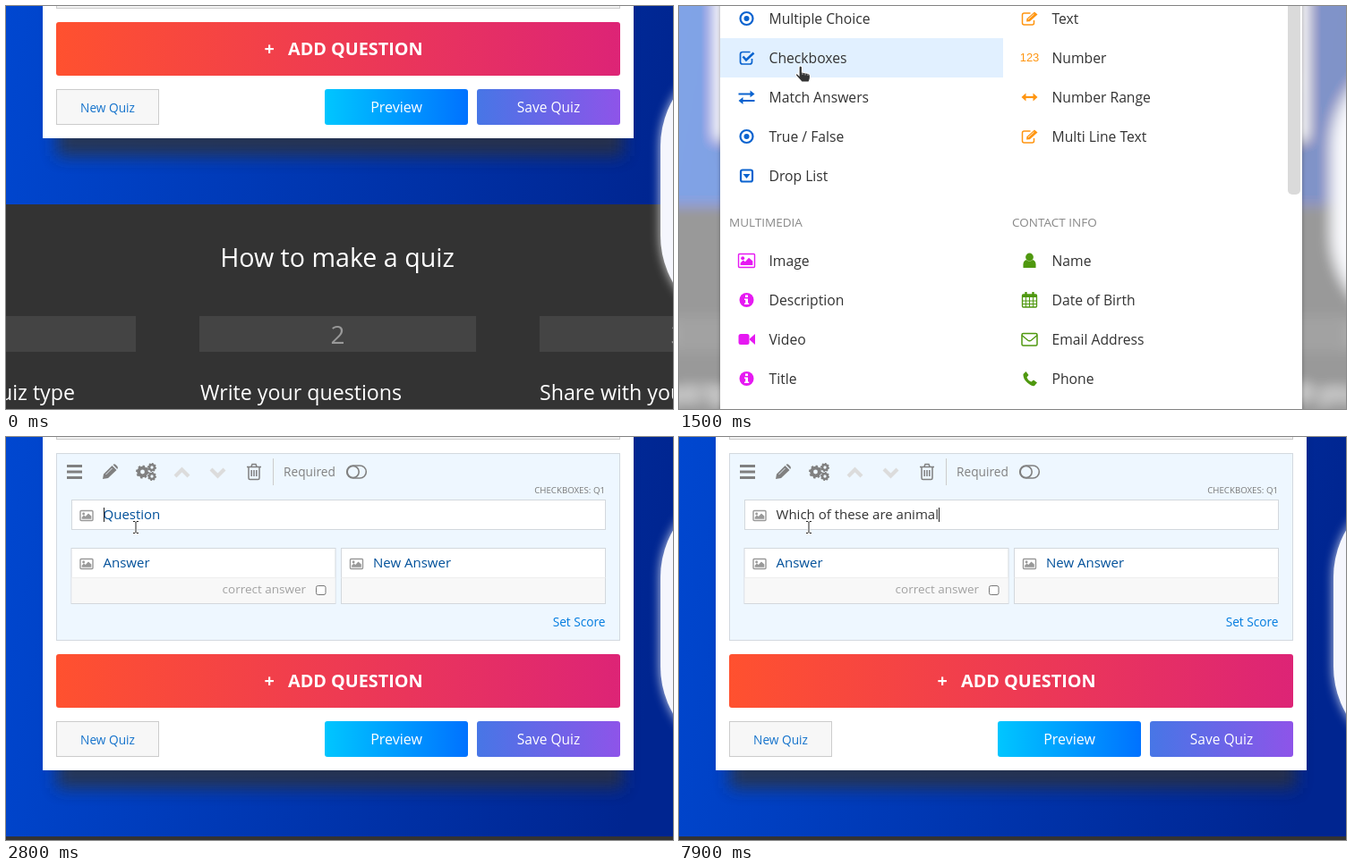
Recreate the animation shown at these times as an HTML page. Size 745 by 451 pixels, loop 8 s.

```html
<!DOCTYPE html>
<html lang="en">
<head>
<meta charset="utf-8">
<title>Quiz builder</title>
<style>
  html, body { margin: 0; width: 100%; height: 100%; overflow: hidden; }
  svg { display: block; width: 745px; height: 451px; font-family: "Open Sans", "Noto Sans", sans-serif; }
  text { white-space: pre; }
</style>
</head>
<body>
<svg id="stage" viewBox="0 0 745 451"></svg>
<script>
const rect = (x, y, w, h, fill, more = '') =>
  `<rect x="${x}" y="${y}" width="${w}" height="${h}" fill="${fill}" ${more}/>`;
const text = (x, y, size, fill, str, more = '') =>
  `<text x="${x}" y="${y}" font-size="${size}" fill="${fill}" ${more}>${str}</text>`;
const at = (x, y, body, more = '') => `<g transform="translate(${x} ${y})" ${more}>${body}</g>`;
const line = (d, color, width, more = '') =>
  `<path d="${d}" fill="none" stroke="${color}" stroke-width="${width}" ${more}/>`;
const shape = (d, fill, more = '') => `<path d="${d}" fill="${fill}" ${more}/>`;
const gradient = (id, x1, x2, colors, y2 = 0) =>
  `<linearGradient id="${id}" gradientUnits="userSpaceOnUse" x1="${x1}" y1="0" x2="${x2}" y2="${y2}">` +
  colors.map((c, i) => `<stop offset="${i / (colors.length - 1)}" stop-color="${c}"/>`).join('') +
  '</linearGradient>';
const blur = (id, size) =>
  `<filter id="${id}" filterUnits="userSpaceOnUse" x="-60" y="-60" width="865" height="571">
   <feGaussianBlur stdDeviation="${size}"/></filter>`;
const MIDDLE = 'text-anchor="middle"', END = 'text-anchor="end"';

// Icons, each centred on 0,0
const picture = (c, w, h) =>
  rect(-w / 2, -h / 2, w, h, 'none', `stroke="${c}" stroke-width="1.4" rx="1"`) +
  `<circle cx="${-w * .24}" cy="${-h * .18}" r="${h * .13}" fill="${c}"/>` +
  shape(`M${-w * .38} ${h * .34}v${-h * .18}l${w * .17} ${-h * .2} ${w * .12} ${h * .12} ${w * .23} ${-h * .3} ${w * .24} ${h * .26}v${h * .3}z`, c);
const gear = (x, y, r) => at(x, y,
  `<circle r="${r * .62}" fill="none" stroke="#808080" stroke-width="${r * .55}"/>
   <circle r="${r * .9}" fill="none" stroke="#808080" stroke-width="${r * .32}" pathLength="16" stroke-dasharray="1"/>`);
const icon = {
  radio: c => `<circle r="7" fill="none" stroke="${c}" stroke-width="2.2"/><circle r="3" fill="${c}"/>`,
  check: c => line('M6 1V4.5Q6 7 3.5 7H-4.500Q-7 7-7 4.500V-4Q-7-6.500-4.500-6.500H4', c, 1.7) +
    line('M-4-1.500L-.5 2.500 8-5.500', c, 2.6),
  swap: c => line('M-9-3.500H5M-5 4H9', c, 2.2) + shape('M4-7.500L9-3.500 4 .3ZM-4 0L-9 4-4 8Z', c),
  drop: c => rect(-6.5, -6.5, 13, 13, 'none', `stroke="${c}" stroke-width="2.2" rx="2"`) + shape('M-4-2H4L0 3Z', c),
  edit: c => line('M5 2V5Q5 7 3 7H-6Q-8 7-8 5V-4Q-8-6-6-6H1', c, 1.5) +
    shape('M-3.500 3.500L-3 .2 5.500-7.500 9-4.500.3 3.200Z', c) + line('M-1.500 1L5-5', '#fff', .8),
  digits: c => text(0, 4, 13, c, '123', MIDDLE + ' font-family="Liberation Sans, Arial, sans-serif"'),
  range: c => line('M-6 0H6', c, 2.2) + shape('M-4-4.500L-9 0-4 4.500ZM4-4.500L9 0 4 4.500Z', c),
  image: c => picture(c, 18, 15),
  info: c => `<circle r="8" fill="${c}"/>` + shape('M-1.500-5.500h3v2.500h-3zM-2.500-1.500h4v5h1.200v1.500h-5.200v-1.500h1.200v-3.500h-1.200z', '#fff'),
  video: c => rect(-9, -6, 12, 12, c, 'rx="2.5"') + shape('M3.500-.8L9.500-6V6L3.500.8Z', c),
  user: c => `<circle cy="-4" r="4.400" fill="${c}"/>` + shape('M-7 8Q-8 0-3.500-1Q0 2 3.500-1Q8 0 7 8Z', c),
  calendar: c => rect(-8, -6, 16, 14, 'none', `stroke="${c}" stroke-width="1.3" rx="1"`) +
    rect(-8, -6, 16, 3, c) + line('M-8 1H8M-8 4.500H8M-4-3V8M0-3V8M4-3V8', c, 1) + line('M-4-9V-4M4-9V-4', c, 2.4),
  mail: c => rect(-8.500, -6.500, 17, 13.500, 'none', `stroke="${c}" stroke-width="1.5" rx="1.5"`) +
    line('M-8.500-4.500L-2 1Q0 2.400 2 1L8.500-4.500', c, 1.4),
  phone: c => shape('M-7-5l3-3 3 4-2 2.500q1.500 4 5 5l2.500-2 4 3-3 3.500q-3 1-8-3.500q-5-4.500-4.500-9.500z', c)
};

const button = (x, label, fill, size) =>
  rect(x, 93, 160, 40, fill, 'rx="3"') + text(x + 80, 119, size, '#fff', label, MIDDLE);

const footer =
  rect(-60, 222, 865, 500, '#333') +
  text(370, 292, 28.6, '#fff', 'How to make a quiz', MIDDLE) +
  [[-164, '1'], [216, '2'], [596, '3']].map(([x, n]) =>
    rect(x, 347, 309, 40, '#444') + text(x + 154.500, 378, 28, '#999', n, MIDDLE)).join('') +
  text(77, 441, 23.2, '#fff', 'quiz type', END) +
  text(217, 441, 23.2, '#fff', 'Write your questions') +
  text(596, 441, 23.2, '#fff', 'Share with your friends');

const controls =
  rect(56, 18, 630, 60, 'url(#add)', 'rx="3"') +
  text(288.500, 55, 19.800, '#fff', '+', 'font-weight="700"') +
  text(315, 55, 19.800, '#fff', 'ADD QUESTION', 'font-weight="700"') +
  rect(56.500, 93.500, 114, 39, '#f7f7f7', 'stroke="#ccc"') +
  text(113.500, 118.500, 13.700, '#1573cc', 'New Quiz', MIDDLE) +
  button(356, 'Preview', 'url(#preview)', 16) +
  button(526, 'Save Quiz', 'url(#save)', 15.500);

const answer = (x, label) =>
  rect(x, 124.500, 295, 62, '#fff', 'stroke="#d3d8dd"') +
  rect(x + .5, 157, 294, 29, '#f8f8f8') + line(`M${x} 157.500h295`, '#eee', 1) +
  at(x + 17, 142, picture('#999', 14, 11)) + text(x + 35.500, 146, 15, '#00509a', label);

const question =
  rect(56.500, 18.500, 629, 209, '#eef7ff', 'stroke="#d3d9df"') +
  line('M68 32.500H85M68 39H85M68 45.500H85', '#808080', 3) +
  at(116, 39, shape('M-8 8L-7 2.500 2.500-7 7.500-2 -2 7ZM3.500-8Q5-9.500 6.500-8L8.500-6Q9.500-4.500 8.300-3Z', '#808080') +
    line('M-4.500 3L2.500-4', '#eef7ff', .9)) +
  gear(152.500, 39, 7) + gear(163, 34, 4.800) + gear(163, 44, 4.800) +
  line('M189 44L196.500 36.500 204 44M229 36L236.500 43.500 244 36', '#dcdcdc', 4.200) +
  at(277, 39, line('M-8-5.500H8M-3-6L-2-8.500H2L3-6M-6-5V7Q-6 8.500-4.500 8.500H4.500Q6 8.500 6 7V-5M-2.800-2V5M0-2V5M2.800-2V5', '#808080', 1.5)) +
  line('M298.500 24V54', '#ccc', 1) +
  text(310, 44, 13.700, '#808080', 'Required') +
  rect(380.700, 32, 21.600, 14, 'none', 'rx="7" stroke="#808080" stroke-width="1.6"') +
  '<circle cx="387.700" cy="39" r="6.500" fill="#eef7ff" stroke="#808080" stroke-width="1.6"/>' +
  text(669, 63, 9.700, '#777', 'CHECKBOXES: Q1', END) +
  rect(73.500, 70.500, 596, 33, '#fff', 'stroke="#d3d8dd"') +
  at(90, 88, picture('#999', 14, 11)) +
  text(108.500, 92, 15, '#00509a', 'Question', 'id="entry"') +
  rect(0, 79, 1, 16, '#222', 'id="caret"') +
  answer(73, 'Answer') + answer(374.500, 'New Answer') +
  text(335, 175, 13.500, '#a2a2a2', 'correct answer', END) +
  rect(346.500, 166.500, 10.500, 10, '#fff', 'rx="2" stroke="#777"') +
  text(669.500, 212, 13.700, '#007bdf', 'Set Score', END);

const list = (x, y, color, rows) => rows.map(([name, label], i) =>
  at(x + 29.500, y + i * 44, icon[name](color)) + text(x + 54.500, y + i * 44 + 5.800, 15.700, '#333', label)).join('');

const popup =
  rect(46, -40, 650, 600, '#fff', 'id="sheet" style="filter:drop-shadow(0 0 2px #0005)"') +
  '<g clip-path="url(#sheetClip)">' +
  rect(46, 36, 316, 44, '#e1f0ff') +
  list(46, 14, '#0a63cf', [['radio', 'Multiple Choice'], ['check', 'Checkboxes'], ['swap', 'Match Answers'],
    ['radio', 'True / False'], ['drop', 'Drop List']]) +
  list(362, 14, '#ff9510', [['edit', 'Text'], ['digits', 'Number'], ['range', 'Number Range'], ['edit', 'Multi Line Text']]) +
  text(56, 247, 13.500, '#888', 'MULTIMEDIA') + text(372, 247, 13.500, '#888', 'CONTACT INFO') +
  list(46, 285, '#e619f2', [['image', 'Image'], ['info', 'Description'], ['video', 'Video'], ['info', 'Title']]) +
  list(362, 285, '#4f980f', [['user', 'Name'], ['calendar', 'Date of Birth'], ['mail', 'Email Address'], ['phone', 'Phone']]) +
  rect(680, -20, 14, 231, '#dadada', 'rx="5"') + '</g>';

const beam = 'M-3-6.500h2l1 1 1-1h2M0-5.500v11M-3 6.500h2l1-1 1 1h2';
const cursors = {
  arrow: shape('M0 0V15L3.500 12 6 17.500 8.500 16.500 6 11H10.500Z', '#333', 'stroke="#fff"'),
  hand: shape('M-2 1.500Q-.3-1.500 1.500 1.500V7L8.500 8.500Q10.500 9 10.500 11.500V13Q10.500 15 9 18H1L-5 11.500Q-6.500 9-4 8.500L-2 10.500Z', '#333', 'stroke="#fff" stroke-width="1.200"') +
    line('M2 7v3M5 8v2.500M8 8.500v2.500', '#ddd', .7),
  beam: line(beam, '#fff', 2.500) + line(beam, '#222', 1)
};

stage.innerHTML = '<defs>' +
  gradient('sky', 0, 745, ['#0047d0', '#002590'], 130) +
  gradient('add', 56, 1316, ['#ff512f', '#dd2476', '#ff512f']) +
  gradient('preview', 356, 516, ['#00c6ff', '#0072ff']) +
  gradient('save', 526, 686, ['#4776e6', '#8e54e9']) +
  blur('soft', 9) + blur('glow', 6) + blur('haze', 7) +
  '<clipPath id="sheetClip"><rect id="sheetBox" x="46" y="-40" width="650"/></clipPath></defs>' +
  '<g id="page">' + rect(-60, -60, 865, 800, 'url(#sky)') +
  rect(57, -60, 632, 228, '#333', 'id="shadow" opacity=".75" filter="url(#soft)"') +
  rect(41, -60, 660, 208, '#fff', 'id="panel"') +
  rect(56.500, -20, 629, 22.500, '#f2f2f2', 'stroke="#ccc"') +
  `<g id="question">${question}</g><g id="controls">${controls}</g><g id="footer">${footer}</g>` +
  rect(731, 52, 240, 310, '#fff', 'rx="105" opacity=".8" filter="url(#glow)"') +
  rect(731, 52, 240, 310, '#f5f6fd', 'rx="105"') + '</g>' +
  rect(0, 0, 745, 451, '#fff', 'id="veil" opacity=".5"') +
  `<g id="popup">${popup}</g>` +
  Object.entries(cursors).map(([name, art]) => `<g id="${name}">${art}</g>`).join('');

const $ = id => document.getElementById(id);
const set = (id, name, value) => $(id).setAttribute(name, value);
const show = (id, on) => set(id, 'visibility', on ? 'visible' : 'hidden');
const clamp = v => Math.min(1, Math.max(0, v));

const phrase = 'Which of these are animal';
const keyTimes = [36, 44, 46, 47, 48, 50, 52, 53, 55, 57, 58, 59, 61, 62, 63, 64, 66, 67, 68, 71, 72, 74, 76, 78, 79];

// Pointer stops: time, x, y
const path = [[300, 190, 235], [500, 140, 72], [700, 128, 51], [1100, 128, 51], [1600, 138, 71],
  [2300, 138, 71], [2400, 138, 75], [2600, 138, 75], [2700, 149, 92], [2800, 145, 101], [8000, 145, 101]];

function pointer(t) {
  const i = Math.max(1, path.findIndex(p => p[0] >= t));
  const [a, b] = [path[i - 1], path[i]];
  const u = clamp((t - a[0]) / (b[0] - a[0]));
  return [1, 2].map(k => a[k] + (b[k] - a[k]) * u);
}

function draw(now) {
  const t = Math.floor(now % 8000 / 100) * 100;
  const grow = t < 2000 ? 0 : t < 2100 ? 201 : t < 2200 ? 220 : 225;
  const open = t >= 900 && t < 2100, dim = t >= 900 && t < 2000;

  // Button colour slides left while hovered
  const u = clamp((t - 500) / 500);
  const slide = t < 900 ? 630 * (1 - (1 - u ** 1.25) ** 3) : 0;
  set('add', 'x1', 56 - slide);
  set('add', 'x2', 1316 - slide);

  set('panel', 'height', 208 + grow);
  set('shadow', 'height', 228 + grow);
  for (const id of ['controls', 'footer']) set(id, 'transform', `translate(0 ${grow})`);
  show('question', grow);
  set('page', 'filter', dim ? 'url(#haze)' : 'none');
  show('veil', dim);
  show('popup', open);
  const sheet = dim ? 600 : 387;
  set('sheet', 'height', sheet);
  set('sheetBox', 'height', sheet);

  const count = keyTimes.filter(k => k * 100 <= t).length;
  const entry = $('entry');
  entry.textContent = count ? phrase.slice(0, count) : 'Question';
  entry.setAttribute('fill', count ? '#333' : '#00509a');
  entry.setAttribute('xml:space', 'preserve');
  const width = count ? entry.getComputedTextLength() : 0;
  set('caret', 'x', Math.round(108.500 + width));
  show('caret', t >= 2800 && t < 3300 || t >= 3600 && t < 4200 || t >= 4400);

  const [x, y] = pointer(t);
  const kind = t < 300 ? '' : t < 500 ? 'arrow' : t < 2000 ? 'hand' : 'beam';
  for (const id in cursors) {
    show(id, id === kind);
    set(id, 'transform', `translate(${x} ${y})`);
  }
}

const start = performance.now();
(function tick() {
  draw(performance.now() - start);
  requestAnimationFrame(tick);
})();
</script>
</body>
</html>
```
